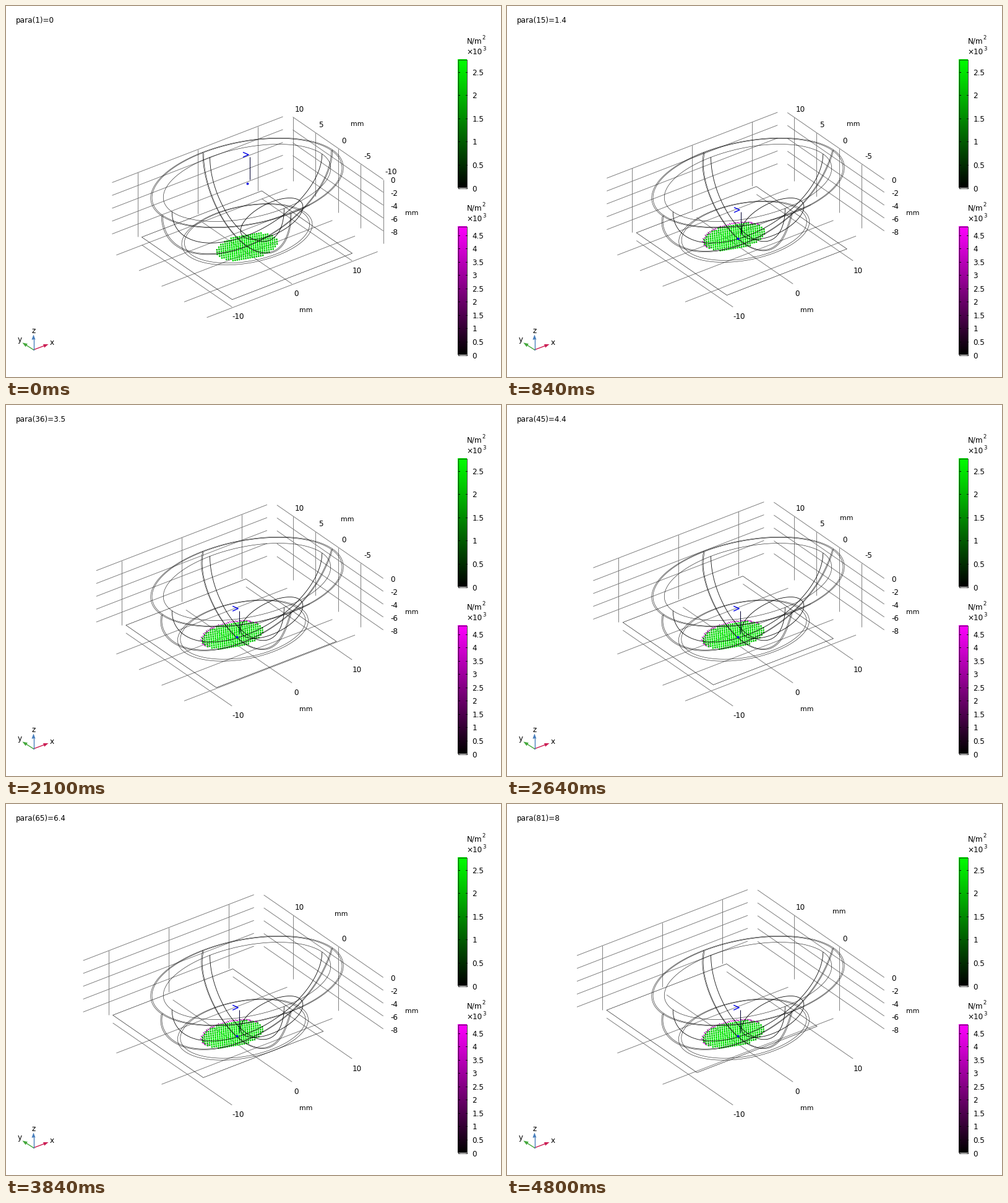
Write a matplotlib script that moves like this. It is 800 px wide and 600 px high and loops after 4.86 s.

```python
import numpy as np
import matplotlib.pyplot as plt
from matplotlib.animation import FuncAnimation
from matplotlib.collections import LineCollection
from matplotlib.patches import Polygon, Rectangle

FRAMES, INTERVAL = 81, 60
DPI = 100
PX = 72 / DPI  # points per pixel

plt.rcParams["font.family"] = "DejaVu Sans"
fig = plt.figure(figsize=(8, 6), dpi=DPI, facecolor="white")
ax = fig.add_axes([0, 0, 1, 1])
ax.axis("off")

# Oblique projection: screen pixels per millimetre along each axis.
ORIGIN = np.array([389.0, 285.5])
EX = np.array([9.7, -3.74])
EY = np.array([-7.31, -5.05])
EZ = np.array([0.0, -10.4])
FLOOR = -9.7
DZ = 20.8  # screen distance of two z grid lines


def project(x, y, z):
    x, y, z = np.broadcast_arrays(x, y, z)
    return (ORIGIN + x[..., None] * EX + y[..., None] * EY + z[..., None] * EZ)


def text(x, y, s, size=12, ha="center"):
    return ax.text(x, y, s, fontsize=size * PX, ha=ha,
                   va="center_baseline", color="black")


def lines(color, width, zorder):
    coll = LineCollection([], colors=color, linewidths=width * PX,
                          zorder=zorder)
    ax.add_collection(coll)
    return coll


# ---------- colour bars ----------
def colorbar(top, rgb, peak, last):
    left, width, height = 730, 14, 208
    ramp = np.linspace(1, 0, height)[:, None, None] * np.array(rgb)
    ax.imshow(ramp, extent=(left - .5, left + width + .5, top + height, top),
              aspect="auto", interpolation="nearest", zorder=2)
    ax.add_patch(Rectangle((left, top), width, height, fill=False,
                           ec="black", lw=0.7 * PX, zorder=3))
    for k in range(last + 1):
        v = k / 2
        y = top + height - v / peak * height
        for x in (left, left + width - 2):
            ax.plot([x, x + 2], [y, y], color="black", lw=PX, zorder=3)
        text(753, y, f"{v:g}", ha="left")
    for dy, s, sup, x in ((-31, "N/m", "2", 769), (-13, "×10", "3", 770)):
        text(744, top + dy, s, ha="left")
        text(x, top + dy - 4.5, sup, size=8.5, ha="left")


colorbar(86, (0, 1, 0), 2.77, 5)
colorbar(356, (1, 0, 1), 4.83, 9)


# ---------- orientation triad ----------
def triad_arrow(tip, color):
    base, tip = np.array([44.0, 555.5]), np.array(tip, float)
    u = (tip - base) / np.hypot(*(tip - base))
    n = np.array([-u[1], u[0]]) * 3
    neck = tip - 8 * u
    ax.plot(*zip(base, neck), color=color, lw=1.4 * PX)
    ax.add_patch(Polygon([tip, neck + n, neck - n], fc=color, ec="none"))


triad_arrow((68, 546.5), "#cc1f55")
triad_arrow((26, 544), "#44a83c")
triad_arrow((44, 531), "#4a80bd")
text(74, 543, "x")
text(21.5, 538, "y")
text(44, 523.5, "z")


# ---------- axis labels ----------
def tick_label(value, zero, axis):
    x, y = np.array(zero) + value * axis
    s = str(value)
    return text(x + 1.75 * (len(s) - 1), y, s)  # long labels lean right


title = text(15, 22, "", ha="left")
for v in (-10, 0, 10):
    tick_label(v, (468.2, 463.5), EX)
y_labels = {v: tick_label(v, (545.4, 216), EY) for v in (10, 5, 0, -5, -10)}
for k in range(5):
    text(621, 281 + 20.9 * k, f"{-2 * k}", ha="left")
text(484.5, 490.5, "mm", size=11)
text(655, 333, "mm", size=11)
y_unit = text(0, 0, "mm", size=11)

# ---------- collections that change ----------
grid = lines("#747474", 0.9, 1)
plate = lines("#222222", 0.65, 2)
rims = lines("#1c1c1c", 0.6, 4)
shell = lines("#111111", 0.6, 4)
inner = lines("black", 0.8, 5)
friction = lines("magenta", 1.2, 2.5)
pressure = lines("lime", 2.4, 3)
pole = lines("#000030", 1.0, 6)
glyph = lines("#0000e6", 1.4, 6)
dot, = ax.plot([], [], "o", ms=3.8 * PX, mfc="#0000e0", mec="none", zorder=7)

T = np.linspace(0, 2 * np.pi, 181)
HALF = np.linspace(0, np.pi, 121)


def ring(a, b, z=0.0, dy=0.0):
    return project(a * np.cos(T), b * np.sin(T) + dy, z)


def meridians(a, b, depth, shift):
    """The two half ellipses of a bowl, its lower part pushed along y."""
    c, s = np.cos(HALF), np.sin(HALF)
    push = shift * np.tanh(3 * s)
    return [project(a * c, push, -depth * s),
            project(0 * c, b * c + push, -depth * s)]


def tilted_ellipse(cx, cy, major, minor, degrees):
    r = np.radians(degrees)
    u, v = major * np.cos(T), minor * np.sin(T)
    return np.c_[cx + u * np.cos(r) + v * np.sin(r),
                 cy - u * np.sin(r) + v * np.cos(r)]


# ---------- contact patch ----------
PATCH_A, PATCH_B = 4.6, 3.05
rng = np.random.default_rng(4)
TO_PLANE = np.linalg.inv(np.c_[EX, EY])
ci, cj = np.meshgrid(np.arange(-16, 17), np.arange(-12, 13))
SPOTS = np.c_[(3.45 * ci + 0.3 * cj).ravel(),
              (3.6 * cj - 0.6 * ci).ravel()]
PLANE = SPOTS @ TO_PLANE.T
RADIUS = np.hypot(PLANE[:, 0] / PATCH_A, PLANE[:, 1] / PATCH_B)
SPOTS, RADIUS = SPOTS[RADIUS < 1], RADIUS[RADIUS < 1]
LEVEL = np.sqrt(1 - RADIUS ** 2)
SHADE = np.clip(0.72 + 0.2 * LEVEL + rng.uniform(-.08, .08, len(LEVEL)), 0, 1)
GREEN = np.c_[0 * SHADE, SHADE, 0 * SHADE]

# Friction arrows stick out of the far edge of the patch.
EDGE = np.radians(np.linspace(5, 190, 52))
EDGE_AT = (np.c_[PATCH_A * np.cos(EDGE), PATCH_B * np.sin(EDGE)]
           @ np.array([EX, EY]))
EDGE_AT = EDGE_AT * rng.uniform(.92, 1.0, (len(EDGE), 1))
GLOW = rng.uniform(.35, .9, len(EDGE))
PINK = np.c_[GLOW, 0 * GLOW, GLOW]


def wall_grid(p):
    """Grid of the two walls and the floor; the far side follows the plate."""
    move = p * EY
    ticks = [10, 0] if p >= 5 else [10, 5, 0, -5]
    if p == 0:
        ticks.append(-10)
    segs = []
    for k in range(5):
        down = np.array([0, DZ * k])
        segs.append([np.array([171, 285]) + move + down,
                     np.array([447, 178.5]) + move + down])
        segs.append([np.array([463, 179]) + move + down,
                     np.array([609.2, 280]) + down])
    for k in range(3):
        step = 10 * k * EX
        top = np.array([212, 268.8]) + move + step
        segs.append([top, top + [0, 104]])
        segs.append([np.array([219, 386]) + move + step,
                     np.array([364.7, 486.3]) + step])
    for y in ticks:
        top = np.array([536.4, 230]) + y * EY
        segs.append([top, top + [0, 103]])
        left = np.array([251, 452.8]) + y * EY
        segs.append([left, left + [276, -106.5]])
    return segs, ticks


def draw(i):
    p = i / 10
    stick = np.tanh(p / 0.75)  # the bowl sticks to the plate, then slips
    sag = 0.9 * stick

    title.set_text(f"para({i + 1})={p:g}")
    segs, ticks = wall_grid(p)
    grid.set_segments(segs)
    for y, label in y_labels.items():
        label.set_visible(y in ticks)
    y_unit.set_position((567, 189.5) if p == 0
                        else (564 - 3.5 * p, 192.8 - 2.55 * p))

    corners = np.array([(-10, -10), (10, -10), (10, 10), (-10, 10), (-10, -10)])
    plate.set_segments([project(corners[:, 0], corners[:, 1] + p, FLOOR)])

    rims.set_segments([ring(14.25, 9.8), ring(14.05, 9.67), ring(12.5, 8.2),
                       ring(9.61, 6.76, -8, sag), ring(9.2, 6.5, -7.9, sag)])
    shell.set_segments(meridians(14.25, 9.8, 9.9, sag)
                       + meridians(14.05, 9.6, 9.8, sag))
    inner.set_segments(meridians(12.5, 8.2, 8.2, 0)
                       + [tilted_ellipse(429, 343.5, 55, 25, 27)])

    centre = np.array([389, 389]) + stick * np.array([-23.3, -17])
    at = centre + SPOTS
    half = np.c_[0.15 + 0 * LEVEL, 1.2 + 0.5 * LEVEL]
    pressure.set_segments(np.stack([at - half, at + half], axis=1))
    pressure.set_color(GREEN)

    if p > 0:
        start = centre + EDGE_AT
        tail = np.array([-2.6, -1.8]) * stick
        friction.set_segments(np.stack([start, start + tail], axis=1))
        friction.set_color(PINK)
        mark = project(0, 2.3 * stick, -9.65)
    else:
        friction.set_segments([])
        mark = project(0, 0, 0)

    dot.set_data([mark[0]], [mark[1] + .5])
    pole.set_segments([mark + np.array([(4.5, -42), (4.5, -5)])])
    glyph.set_segments(
        [mark + np.array([(-6.5, -49.5), (2.5, -45.5), (-6.5, -41.5)])])
    return []


# Whole numbers are pixel centres.
ax.set_xlim(-.5, 799.5)
ax.set_ylim(599.5, -.5)
anim = FuncAnimation(fig, draw, frames=FRAMES, interval=INTERVAL,
                     init_func=lambda: draw(0), repeat=True,
                     repeat_delay=0, blit=False)
plt.show()
```
